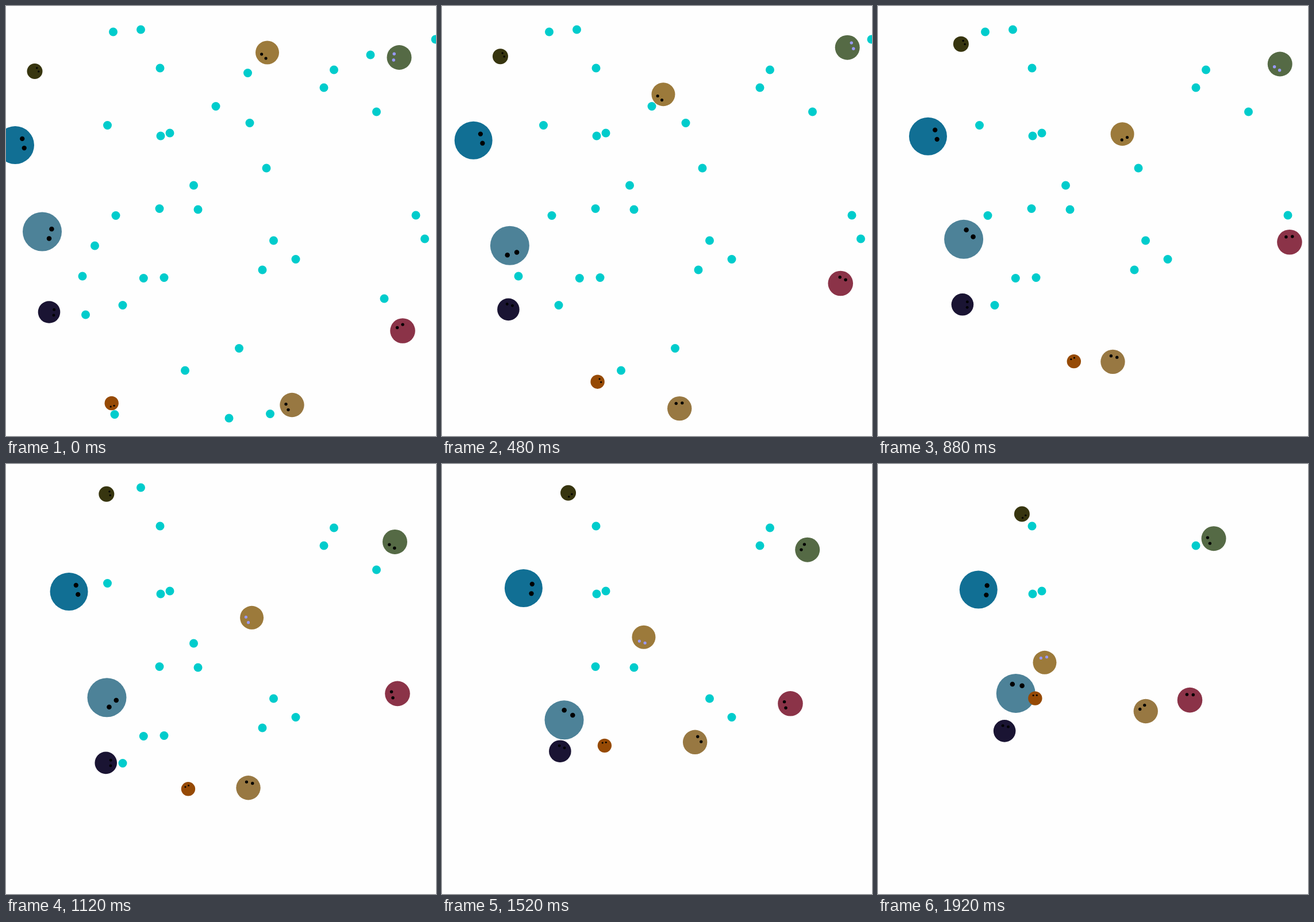
Recreate the animation shown at these times as an HTML page with a canvas. Size 748 px wide and 748 px high, loop 2 s.

```html
<!DOCTYPE html>
<html lang="en">
<head>
<meta charset="utf-8">
<title>Foragers</title>
<style>
  html, body { margin: 0; width: 100%; height: 100%; overflow: hidden; background: #fefefe; }
  canvas { display: block; }
</style>
</head>
<body>
<canvas id="stage" width="748" height="748"></canvas>
<script>
const ctx = document.getElementById('stage').getContext('2d');
const LOOP = 2000, TICK = 40, TICKS = LOOP / TICK;
const SUBSTEPS = 2;      // moves per tick
const FOOD_R = 7.5, REACH = 7;
const LEAD_CHANGE = 27;  // tick at which the pale-eyed leader changes

let food = [
  [186.5, 45], [234.5, 41], [268, 108], [176.5, 207.5], [269, 226], [285, 221],
  [365, 174.5], [420.5, 116.5], [424, 203.5], [553, 142], [570.5, 111], [634, 85],
  [747, 58], [644.5, 184], [453, 282], [326.5, 312], [267, 352.5], [334, 354],
  [191, 364.5], [154.5, 417], [133, 470], [239.3, 473.5], [275, 472.5], [203, 520.5],
  [138.5, 537], [465.5, 408], [504, 440.5], [446, 459], [713, 364], [728.5, 405],
  [658, 509], [405.5, 595.5], [311.5, 634], [388, 717], [459.5, 709.5], [189, 710.5]
].map(([x, y]) => ({ x, y }));

// Speed is in pixels per tick.
const forager = (color, x, y, r, speed) => ({ color, x, y, r, speed });
const gold = forager('#9c7a3b', 454.5, 81, 20.5, 8.38);
const green = forager('#556a45', 684, 89.5, 21.5, 5.9);
const crew = [
  forager('#37350f', 50, 113.5, 13.5, 4.8),
  forager('#116f94', 16, 242, 33, 3.3),
  forager('#4d8298', 63, 392.5, 34, 5.38),
  forager('#1a1433', 75, 532.5, 19.3, 3.83),
  forager('#964a05', 183.7, 691, 12.2, 8.28),
  forager('#987842', 497.5, 694, 21.2, 8.16),
  gold,
  green,
  forager('#8b3348', 690, 565, 21.8, 7.7)
];

const gap = (a, b) => Math.hypot(a.x - b.x, a.y - b.y);

// Direction to the nearest food.
function heading(c) {
  const goal = food.reduce((best, f) => gap(c, f) < gap(c, best) ? f : best);
  return Math.atan2(goal.y - c.y, goal.x - c.x);
}

function move(c) {
  const dir = heading(c), step = c.speed / SUBSTEPS;
  c.x += Math.cos(dir) * step;
  c.y += Math.sin(dir) * step;
  food = food.filter(f => gap(c, f) >= c.r + REACH);
}

// Run the chase once and keep a scene for every tick.
const scenes = [];
for (let tick = 0; tick < TICKS; tick++) {
  const leader = tick < LEAD_CHANGE ? green : gold;
  scenes.push({
    food,
    crew: crew.map(c => ({ ...c, dir: heading(c), eyes: c === leader ? '#9999ff' : '#000' }))
  });
  for (let i = 0; i < SUBSTEPS; i++) crew.forEach(move);
}

function disc(x, y, r, color) {
  ctx.fillStyle = color;
  ctx.beginPath();
  ctx.arc(x, y, r, 0, Math.PI * 2);
  ctx.fill();
}

function draw(scene) {
  ctx.fillStyle = '#fefefe';
  ctx.fillRect(0, 0, 748, 748);
  for (const f of scene.food) disc(f.x, f.y, FOOD_R, '#00cccc');
  for (const { x, y, r, color, dir, eyes } of scene.crew) {
    disc(x, y, r, color);
    for (const side of [-1, 1]) {
      const a = dir + side * Math.PI / 6;
      disc(x + Math.cos(a) * r / 2, y + Math.sin(a) * r / 2, r / 8, eyes);
    }
  }
}

// Three of every five ticks bring a new picture.
const start = performance.now();
function loop() {
  const tick = Math.floor((performance.now() - start) % LOOP / TICK);
  const picture = Math.floor((3 * tick + 1) / 5);
  draw(scenes[Math.ceil(5 * picture / 3)]);
  requestAnimationFrame(loop);
}
loop();
</script>
</body>
</html>
```
